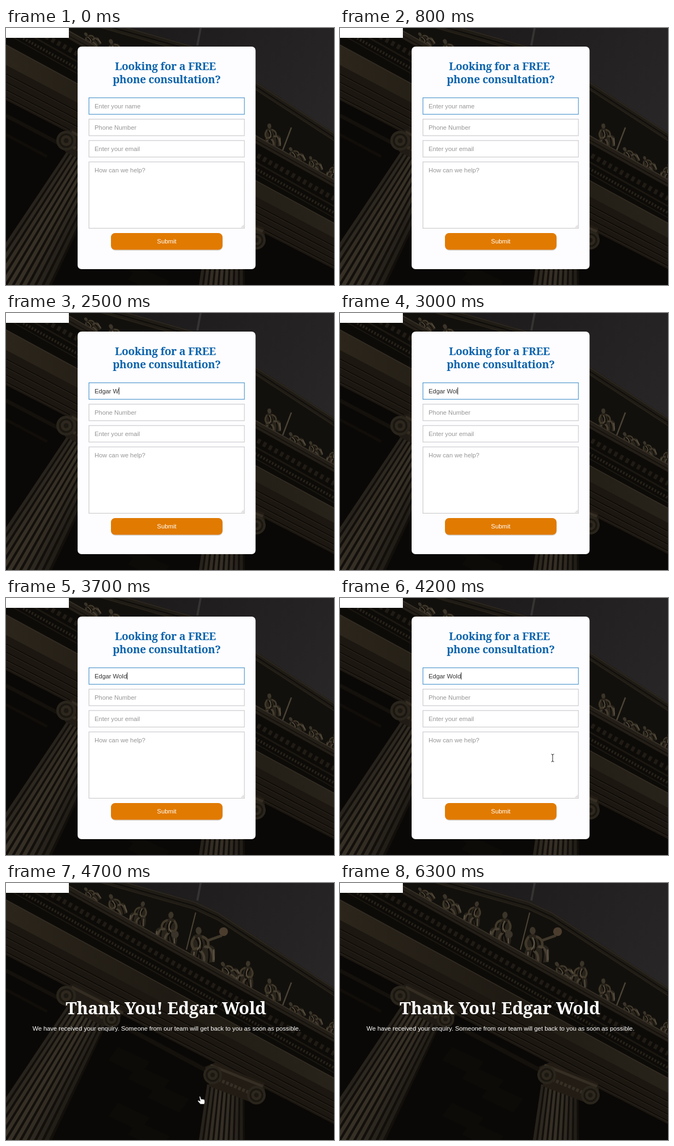
These frames come from a looping animation (600 px wide and 470 px high, 7.2 s). An HTML page:

```html
<!DOCTYPE html>
<html lang="en">
<head>
<meta charset="utf-8">
<title>Phone consultation form</title>
<style>
html, body { margin: 0; width: 100%; height: 100%; overflow: hidden; background: #0b0906; }
svg { display: block; width: 600px; height: 470px; }
text { font: 11.39px "Liberation Sans", Arial, sans-serif; white-space: pre; }
.title { font: bold 19.6px "Noto Serif", serif; letter-spacing: -.25px; fill: #0a63ac; text-anchor: middle; }
.thanks { font: bold 31px "Noto Serif", serif; letter-spacing: -.1px; fill: #fff; }
.hint { fill: #969696; }
.typed { fill: #333; }
.field { fill: #fff; stroke: #cfcfd3; stroke-width: 1.3; }
.field.on { stroke: #5c9fd0; }
</style>
</head>
<body>
<svg id="stage" viewBox="0 0 600 470">
  <defs>
    <linearGradient id="sky" x1="0" y1="0" x2="1" y2=".5">
      <stop offset=".3" stop-color="#1c1a1b"/><stop offset="1" stop-color="#292728"/>
    </linearGradient>
    <linearGradient id="stone" x1="0" x2="1">
      <stop offset="0" stop-color="#2b251b"/><stop offset=".5" stop-color="#1f1a13"/><stop offset="1" stop-color="#28231a"/>
    </linearGradient>
    <filter id="soft"><feGaussianBlur stdDeviation=".7"/></filter>
  </defs>
  <g id="scene" filter="url(#soft)"></g>
  <rect width="115" height="18" fill="#fff"/>

  <g id="card">
    <rect x="131" y="34" width="325.5" height="407" rx="7" fill="#fdfdff"/>
    <text class="title" x="291.5" y="77">Looking for a FREE</text>
    <text class="title" x="294" y="101">phone consultation?</text>
    <rect id="nameBox" class="field" x="151.7" y="127.6" width="284.4" height="30.2"/>
    <rect class="field" x="151.7" y="166.7" width="284.4" height="30.2"/>
    <rect class="field" x="151.7" y="205.8" width="284.4" height="30.2"/>
    <rect class="field" x="151.7" y="244.9" width="284.4" height="121.4"/>
    <path d="M430.5 365l4.5-4.5M433 365l2-2" stroke="#aaa" stroke-width=".8"/>
    <text id="name" x="162" y="146.5"></text>
    <rect id="caret" y="136" width="1" height="13" fill="#222"/>
    <text class="hint" x="162" y="185.5">Phone Number</text>
    <text class="hint" x="162" y="224.5">Enter your email</text>
    <text class="hint" x="162" y="263.5">How can we help?</text>
    <rect x="192" y="376" width="204.5" height="31" rx="8" fill="#b9b2ab" opacity=".6"/>
    <rect x="192" y="375" width="204" height="30.5" rx="7.5" fill="#e17a00"/>
    <rect id="ring" x="191.8" y="374.8" width="204" height="31" fill="none" stroke="#6b9cc4"/>
    <text x="294" y="394" fill="#fff" text-anchor="middle">Submit</text>
  </g>

  <g id="done">
    <text class="thanks" x="109.3" y="240">Thank You! Edgar Wold</text>
    <text x="48.4" y="270" fill="#fff">We have received your enquiry. Someone from our team will get back to you as soon as possible.</text>
  </g>

  <g id="mouse" stroke-linejoin="round">
    <path id="arrow" d="M0 0V14L3.3 11L5.5 16L7.7 15L5.6 10.2H10Z" fill="#000" stroke="#fff"/>
    <path id="beam" d="M-2.5 -7Q0 -7 0 -5Q0 -7 2.5 -7M0 -5V5M-2.5 7Q0 7 0 5Q0 7 2.5 7" fill="none" stroke="#222"/>
    <path id="hand" d="M-1.4 1Q-1 -.4 .4 .2L2.3 5.5Q3.5 4.5 4.5 5.6Q5.7 4.8 6.5 5.9Q8 5.4 8.3 7L8.8 10.5L7.7 14.6H.8L-3.8 9.6Q-5 7.8 -3 7.4L.2 9Z" fill="#fff" stroke="#222" stroke-width=".9"/>
  </g>
</svg>
<script>
const LOOP = 7200, NAME = "Edgar Wold";
const KEYS = [1300, 1500, 1600, 1700, 1900, 2000, 2500, 2700, 3000, 3500];
const MOVE = 3800, REST = 4400, CLICK = 4500, SENT = 4700, HIDE = 5200;
const $ = id => document.getElementById(id);
const show = (id, on) => $(id).style.display = on ? "" : "none";
const mix = (a, b, k) => a + (b - a) * k;

// ---- backdrop ----
const poly = (pts, fill) => `<polygon points="${pts}" fill="${fill}"/>`;
const line = (a, b, color, w = 1, extra = "") =>
  `<path d="M${a}L${b}" stroke="${color}" stroke-width="${w}" fill="none" ${extra}/>`;
const disc = (x, y, r, fill) => `<circle cx="${x}" cy="${y}" r="${r}" fill="${fill}"/>`;
// band across the stage: top and bottom heights at the left and right edges
const band = (l0, l1, r0, r1, fill) => poly([0, l0, 600, r0, 600, r1, 0, l1], fill);
const edge = (l, r, color, w, extra) => line([0, l], [600, r], color, w, extra);

// draped statue; the lap points to the side away from the lean
function figure(x, y, h, lean) {
  const k = h / 60, side = lean < 0 ? k : -k;
  return `<g transform="translate(${x} ${y}) rotate(${lean}) scale(${side} ${k})" fill="none" stroke-linecap="round">
    <path d="M-8 -40Q0 -44 7 -39L10 -24Q25 -24 24 -12L22 4H-15Q-18 -10 -11 -22Z" fill="#28231b"/>
    <ellipse cx="1" cy="-47" rx="4.6" ry="6" fill="#3b3429"/>
    <path d="M-7 -37Q-15 -28 -9 -19L4 -21M7 -37Q16 -32 14 -23" stroke="#403829" stroke-width="4"/>
    <path d="M9 -21Q22 -20 20 2M-2 -17Q8 -12 5 2" stroke="#463e31" stroke-width="4"/>
    <path d="M-4 -35Q4 -25 -8 0M3 -33Q7 -22 1 -16M14 -17Q15 -8 12 3M-1 -12Q2 -6 -3 3" stroke="#100d09" stroke-width="2.5"/>
    <path d="M0 -36Q5 -26 -3 -18M-9 -14L-12 1M22 -15L21 0" stroke="#5d5445" stroke-width="2"/></g>`;
}

const volute = (x, y, r) => disc(x, y, r, "#2a251c") + disc(x, y, r * .74, "#1a1610") +
  disc(x, y, r * .55, "#2d271e") + disc(x, y, r * .25, "#1c1812");

// fluted shaft between a top edge (a-b) and a bottom edge (c-d)
function shaft(a, b, c, d, n) {
  const at = (p, q, k) => [mix(p[0], q[0], k), mix(p[1], q[1], k)];
  let s = poly([a, b, d, c], "#120f0b");
  for (let i = 0; i < n; i++) {
    const k0 = i / n, k1 = (i + .6) / n, v = 20 + 34 * Math.sin(Math.PI * (.2 + .75 * k0));
    s += poly([at(a, b, k0), at(a, b, k1), at(c, d, k1), at(c, d, k0)],
      `rgb(${v | 0},${v * .89 | 0},${v * .71 | 0})`);
  }
  return s;
}

function scene() {
  let s = `<rect width="600" height="470" fill="url(#sky)"/>`;
  // pediment and sloping roof
  s += poly([0, 0, 225, 0, 345, 34, 388, 54, 600, 192, 600, 470, 0, 470], "#12100c");
  const roof = (dy, color, w) => `<path d="M105 ${dy - 34}L345 ${34 + dy}L388 ${54 + dy}L600 ${192 + dy}" stroke="${color}" stroke-width="${w}" fill="none"/>`;
  s += roof(7, "#1f1b15", 13) + roof(1, "#2e2921", 1.5) + roof(8, "#0f0d0a", 2) + roof(14, "#272219", 1.5);
  s += line([356, 0], [350, 32], "#363432", 4);
  // sculpture group
  s += line([347, 54], [330, 122], "#4b4336", 2);
  for (const f of [[163, 34, 36, -38], [206, 58, 46, -24], [242, 75, 48, 14], [296, 107, 62, 8],
    [356, 142, 70, -5], [416, 177, 44, -35], [438, 188, 52, 8], [486, 215, 46, -8],
    [536, 247, 38, -32], [568, 262, 34, -25], [597, 275, 32, 12]]) s += figure(...f);
  s += line([367, 106], [395, 96], "#40382b", 5) + disc(398, 89, 8, "#4b3d2e") + disc(309, 94, 7, "#39332a");
  s += line([522, 182], [506, 224], "#4b4336", 2.5);
  // ledge, dentils and frieze
  s += band(-60, -44, 276, 291, "#231e17") + edge(-59, 277, "#3a3329", 1.5) + edge(-50, 285, "#12100b", 1.5);
  s += band(-44, 32, 291, 356, "#0d0b08");
  s += edge(-26, 312, "#201b14", 9, 'stroke-dasharray="6 6"');
  s += edge(-12, 326, "#1c1811", 3) + edge(1, 338, "#272219", 5, 'stroke-dasharray="3 3"') + edge(10, 347, "#1c1811", 2);
  s += band(30, 68, 356, 384, "url(#stone)") + edge(31, 357, "#332c22", 1.5);
  s += band(68, 132, 384, 441, "#1c1711");
  for (const [l, r] of [[84, 399], [99, 411], [113, 423], [126, 435]])
    s += edge(l, r, "#0b0906", 1.4) + edge(l + 2, r + 2, "#2a241b");
  // shadowed ceiling
  s += band(132, 820, 441, 820, "#0a0806");
  for (let i = 0; i < 5; i++) {
    const x = 205 + 36 * (i % 3), y = 300 + 34 * i;
    s += poly([x, y, x + 58, y + 27, x + 40, y + 52, x - 18, y + 24], "#0d0b08");
  }
  s += line([0, 160], [110, 218], "#14110c", 7) + line([0, 195], [75, 235], "#110e0a", 5);
  s += line([215, 262], [365, 342], "#14110c", 8);
  // left column
  s += shaft([114, 222], [184, 258], [-52, 470], [84, 470], 10);
  s += poly([98, 192, 125, 184, 214, 230, 208, 250, 178, 262, 108, 226], "#201b14");
  s += line([120, 190], [214, 238], "#332c22", 5) + line([116, 214], [184, 250], "#322b21", 6, 'stroke-dasharray="5 3"');
  s += volute(110, 206, 18) + volute(193, 249, 16);
  // right column
  s += shaft([368, 368], [436, 386], [353, 470], [437, 470], 9);
  s += poly([364, 336, 384, 328, 472, 366, 474, 384, 446, 400, 372, 372], "#221c15");
  s += line([374, 333], [470, 372], "#352e24", 5) + line([388, 359], [444, 383], "#362f25", 6, 'stroke-dasharray="5 3"');
  return s + volute(378, 351, 17) + volute(458, 388, 17);
}
$("scene").innerHTML = scene();

// ---- playback ----
function setMouse(t) {
  show("mouse", t >= MOVE && t < HIDE);
  const p = Math.min(1, Math.max(0, (t - MOVE) / (REST - MOVE)));
  const k = p * p * (3 - 2 * p), x = mix(486, 355, k), y = mix(14, 390, k);
  $("mouse").setAttribute("transform", `translate(${x} ${y})`);
  const hand = y > 375, beam = !hand && x < 436 && y > 127 && y < 366;
  show("hand", hand);
  show("beam", beam);
  show("arrow", !hand && !beam);
}

function draw(t) {
  const n = KEYS.filter(k => k <= t).length, name = $("name");
  name.textContent = n ? NAME.slice(0, n) : "Enter your name";
  name.setAttribute("class", n ? "typed" : "hint");
  $("nameBox").setAttribute("class", t < CLICK ? "field on" : "field");
  if (t < SENT) $("caret").setAttribute("x", 162 + name.getComputedTextLength());
  show("caret", n > 0 && t < CLICK);
  show("ring", t >= CLICK);
  show("card", t < SENT);
  show("done", t >= SENT);
  setMouse(t);
}

function tick() {
  draw(Math.floor(performance.now() % LOOP / 100) * 100);
  requestAnimationFrame(tick);
}
tick();
</script>
</body>
</html>
```
